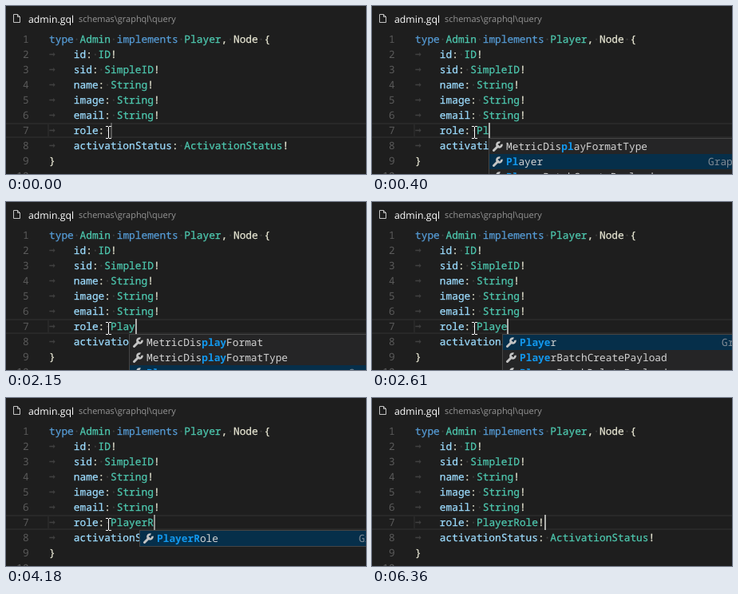
These frames come from a looping animation (451 px wide and 210 px high, 6610 ms). An HTML page:

```html
<!DOCTYPE html>
<html lang="en">
<head>
<meta charset="utf-8">
<title>Autocomplete</title>
<style>
  html, body { margin: 0; width: 100%; height: 100%; overflow: hidden; background: #1e1e1e; }
  body {
    position: relative; color: #d4d4d4; text-rendering: geometricPrecision;
    font: 12.83px/19px 'Noto Sans Mono', 'DejaVu Sans Mono', monospace;
  }
  body > *, .line, .icon, .detail { position: absolute; white-space: pre; }
  header { left: 28px; top: 7px; font: 12.3px/19px 'Open Sans', 'Noto Sans', sans-serif; color: #fff; }
  header span { position: absolute; left: 63px; font-size: 10.96px; color: #969696; }
  #file { left: 8px; top: 9px; }
  #code { color: #e6e5d2; -webkit-text-stroke: .25px; }
  .line { left: 54px; }
  .number { position: absolute; left: -54px; top: 0; width: 28.7px; text-align: right; color: #5a5a5a; -webkit-text-stroke: 0; }
  .keyword { color: #569cd6; }
  .type { color: #4ec9b0; }
  .field { color: #9cdcfe; }
  .blank { color: #404040; font-style: normal; }
  .tab { display: inline-block; width: 30.8px; height: 19px; vertical-align: top; font-family: 'DejaVu Sans Mono', monospace; }
  .current { top: 146px; height: 15px; border: solid #282828; border-width: 2px 0; }
  #gutter { left: 0; width: 52px; border-right-width: 2px; }
  #content { left: 54px; right: 0; }
  #caret { top: 146px; width: 2px; height: 19px; background: #aeafad; }
  #popup { top: 165px; width: 430px; background: #252526; border: 1px solid #454545; }
  .row { position: relative; height: 19px; padding-left: 21px; }
  .selected { background: #062f4a; }
  .row b { color: #1298ee; }
  .icon { left: 3px; top: 3px; }
  .detail { left: 274px; top: 0; color: #7f8a94; }
</style>
</head>
<body>
<svg id="file" width="12" height="13" fill="none" stroke="#c5c5c5"><path d="M1.5 1.5H6.5L9.5 4.5V11.5H1.5ZM6.5 1.5V4.5H9.5"/></svg>
<header>admin.gql<span>schemas\graphql\query</span></header>
<div id="gutter" class="current"></div>
<div id="content" class="current"></div>
<div id="code"></div>
<div id="caret"></div>
<div id="popup"></div>
<svg id="mouse" width="7" height="16" fill="none" stroke="#fff"><path d="M0 .5H3M4 .5H7M3.5 1V15M0 15.5H3M4 15.5H7"/></svg>
<script>
const LOOP = 6610, CHAR = 7.698, TYPED_X = 131;
const [code, caret, popup, mouse] =
  ['code', 'caret', 'popup', 'mouse'].map(id => document.getElementById(id));

const source = [
  'type Admin implements Player, Node {',
  '\tid: ID!', '\tsid: SimpleID!', '\tname: String!', '\timage: String!', '\temail: String!',
  '\trole: ', '\tactivationStatus: ActivationStatus!', '}', ''
];

const format = 'MetricDisplayFormat', create = 'PlayerBatchCreatePayload';
const early = [format + 'Type', 'Player', create];
const mixed = [format, format + 'Type', 'Player'];
const players = ['Player', create, 'PlayerBatchDeletePayload'];
const role = ['PlayerRole'];

// time, typed text, caret opacity, popup left, popup rows
const cues = [
  [0, '', .4],
  [150, 'P', 1, 139, early],
  [400, 'Pl', 1, 146, early],
  [550, 'Pla', 1, 154, mixed],
  [1240, 'Pla', .45, 154, mixed],
  [1390, 'Pla', 0, 154, mixed],
  [1660, 'Pla', .15, 154, mixed],
  [1780, 'Pla', .6, 154, mixed],
  [1900, 'Pla', 1, 154, mixed],
  [2150, 'Play', 1, 154, mixed],
  [2300, 'Play', 1, 163, mixed],
  [2610, 'Playe', 1, 163, players],
  [2760, 'Player', 1, 167, players],
  [3450, 'Player', .5, 167, players],
  [3570, 'PlayerR', 1, 167, role],
  [4180, 'PlayerR', .8, 167, role],
  [4330, 'PlayerR', .3, 167, role],
  [4450, 'PlayerR', 0, 167, role],
  [4730, 'PlayerRole', 1],
  [5110, 'PlayerRole!', 1],
  [5700, 'PlayerRole!', .85],
  [5820, 'PlayerRole!', .4],
  [5940, 'PlayerRole!', 0],
  [6240, 'PlayerRole!', .6],
  [6360, 'PlayerRole!', 1]
];

// time, left, top; without a place the pointer is hidden
const pointer = [[0, 125, 150], [5700, 206, 169], [5820, 287, 188], [5940]];

const wrench = `<svg class="icon" width="14" height="14" fill="none" stroke="#c5c5c5">
  <path stroke-width="3" stroke-linecap="round" d="M2.5 11.5L8 6"/>
  <path stroke-width="2.6" d="M10.4 1.6A3 3 0 1 0 12.4 3.8"/></svg>`;

const at = (list, time) => list.findLast(item => item[0] <= time);

// A type after a comma stays plain.
function paint(line) {
  return line.replace(/\b(type|implements)\b|((?<!, )[A-Z]\w*)|(\w+(?=:))|(\t)|( )/g,
    (text, keyword, type, field, tab) => {
      if (keyword) return `<span class="keyword">${text}</span>`;
      if (type) return `<span class="type">${text}</span>`;
      if (field) return `<span class="field">${text}</span>`;
      return tab ? '<i class="blank tab">→</i>' : '<i class="blank">·</i>';
    });
}

code.innerHTML = source.map((line, i) =>
  `<div class="line" style="top:${32 + 19 * i}px"><span class="number">${i + 1}</span><span>${paint(line)}</span></div>`
).join('');
const roleLine = code.children[6].lastChild;

function showPopup(typed, left, rows) {
  popup.style.display = rows ? '' : 'none';
  if (!rows) return;
  popup.style.left = left + 'px';
  const chosen = rows.findIndex(name => name.startsWith('Player'));
  popup.innerHTML = rows.map((name, i) => {
    const label = name.replace(new RegExp(typed, 'i'), '<b>$&</b>');
    return i === chosen
      ? `<div class="row selected">${wrench}${label}<span class="detail">GraphQL</span></div>`
      : `<div class="row">${wrench}${label}</div>`;
  }).join('');
}

let shown;
function draw(now) {
  const time = now % LOOP;
  const cue = at(cues, time);
  if (cue !== shown) {
    const [, typed, opacity, left, rows] = shown = cue;
    roleLine.innerHTML = paint(source[6] + typed);
    caret.style.left = Math.round(TYPED_X + CHAR * typed.length) + 'px';
    caret.style.opacity = opacity;
    showPopup(typed, left, rows);
  }
  const [, x, y] = at(pointer, time);
  mouse.style.display = x ? '' : 'none';
  mouse.style.left = x + 'px';
  mouse.style.top = y + 'px';
}

const start = performance.now();
function tick() {
  draw(performance.now() - start);
  requestAnimationFrame(tick);
}
tick();
</script>
</body>
</html>
```
